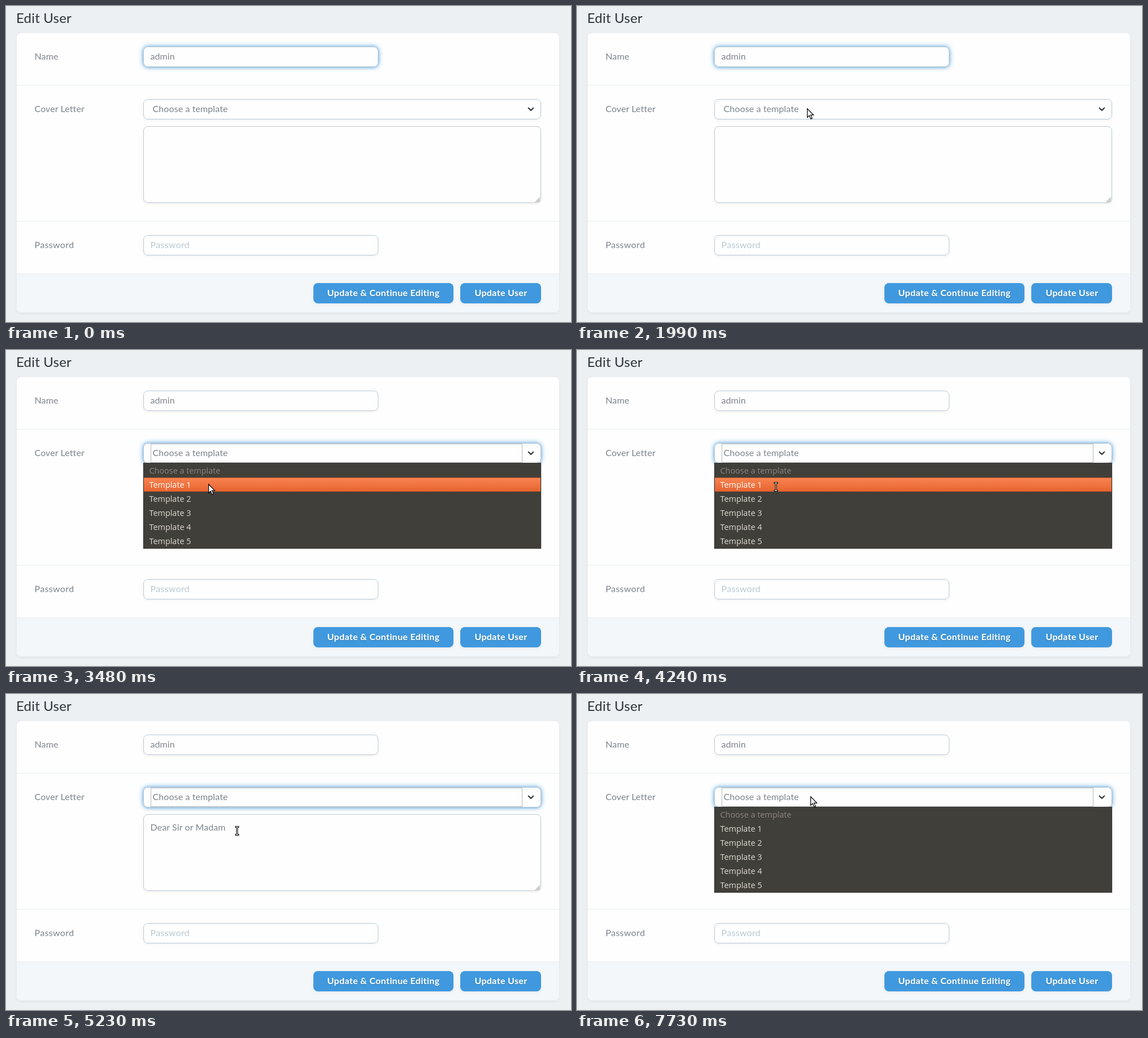
These frames come from a looping animation (1000x560 px, 8 s). An HTML page:

```html
<!DOCTYPE html>
<html lang="en">
<head>
<meta charset="utf-8">
<title>Edit User</title>
<style>
  html, body { margin: 0; width: 100%; height: 100%; overflow: hidden; background: #ecf0f3; }
  svg { display: block; width: 1000px; height: 560px; cursor: default; }
  text { font: 16px Lato, "Open Sans", sans-serif; letter-spacing: .1px; fill: #7c858e; white-space: pre; }
  .title { font-size: 24px; letter-spacing: .2px; fill: #2b333d; }
  .hint { fill: #b9c8d3; letter-spacing: .3px; }
  .wide { letter-spacing: .35px; }
  .button text { font-weight: 700; letter-spacing: .35px; fill: #fff; text-anchor: middle; filter: url(#textShade); }
  .button rect { fill: #4099de; filter: url(#soft); }
  .field { fill: #fefefe; stroke: #bacad6; filter: url(#soft); }
  .glow { fill: #4099de; filter: url(#blur); }
  .line { stroke: #e9eef1; }
  .menu text { font: 14.4px "Open Sans", "Noto Sans", sans-serif; letter-spacing: 0; fill: #dfdbd2; }
  .menu .off { fill: #8d8680; }
  .menu .lit { fill: #fff; }
</style>
</head>
<body>
<svg viewBox="0 0 1000 560" xmlns="http://www.w3.org/2000/svg">
  <defs>
    <filter id="blur" filterUnits="userSpaceOnUse" x="220" y="50" width="750" height="170">
      <feGaussianBlur stdDeviation="4"/>
    </filter>
    <filter id="soft" filterUnits="userSpaceOnUse" x="0" y="0" width="1000" height="560">
      <feDropShadow dx="0" dy="2" stdDeviation="2" flood-opacity=".05"/>
    </filter>
    <filter id="textShade" filterUnits="userSpaceOnUse" x="530" y="480" width="440" height="60">
      <feDropShadow dx="0" dy="1" stdDeviation="1" flood-opacity=".2"/>
    </filter>
    <linearGradient id="orange" x2="0" y2="1">
      <stop stop-color="#f98452"/>
      <stop offset="1" stop-color="#e7642f"/>
    </linearGradient>
  </defs>

  <rect width="1000" height="560" fill="#ecf0f3"/>
  <text class="title" x="18" y="30">Edit User</text>
  <rect x="19" y="48" width="960" height="495" rx="8" fill="#fefefe" filter="url(#soft)"/>
  <path d="M19 475H979V535a8 8 0 0 1-8 8H27a8 8 0 0 1-8-8Z" fill="#f3f7fa"/>
  <path class="line" d="M19 140.5H979M19 381.5H979M19 474.5H979"/>

  <text x="50.5" y="95">Name</text>
  <text x="50.5" y="188">Cover Letter</text>
  <text class="wide" x="50.5" y="429">Password</text>

  <rect id="nameGlow" class="glow" x="243" y="72" width="416" height="36" rx="8"/>
  <rect class="field" x="243.5" y="72.5" width="415" height="35" rx="7.5"/>
  <text x="255.5" y="95">admin</text>
  <path id="caret" d="M300.5 79V101" stroke="#5f6770"/>

  <rect id="pickGlow" class="glow" x="243" y="165" width="704" height="36" rx="8"/>
  <rect class="field" x="243.5" y="165.5" width="703" height="35" rx="7.5"/>
  <rect id="ring" x="256.5" y="166.5" width="657" height="33" fill="none" stroke="#6f767d" stroke-dasharray="1 1"/>
  <text x="259.5" y="188">Choose a template</text>
  <path d="M924.7 180.7L929 185L933.3 180.7" fill="none" stroke="#252d37" stroke-width="2" stroke-linecap="round" stroke-linejoin="round"/>

  <rect class="field" x="243.5" y="213.5" width="703" height="135" rx="7.5"/>
  <path d="M937 347.5L945 339.5M940 347.5L945 342.5M943 347.5L945 345.5" stroke="#747474"/>
  <text id="letter" x="255.5" y="242">Dear Sir or Madam</text>

  <rect class="field" x="243.5" y="406.5" width="415" height="35" rx="7.5"/>
  <text class="hint" x="255.5" y="429">Password</text>

  <g class="button">
    <rect x="544" y="491" width="248" height="36" rx="8"/>
    <text x="668" y="514">Update &amp; Continue Editing</text>
    <rect x="804" y="491" width="143" height="36" rx="8"/>
    <text x="876" y="514">Update User</text>
  </g>

  <g id="menu" class="menu">
    <rect x="242" y="199" width="706" height="154" rx="1" fill="#000" opacity=".13"/>
    <rect x="243.5" y="200.5" width="703" height="151" fill="#413f3a" stroke="#33312d"/>
    <g id="bar">
      <rect x="244" y="226" width="702" height="25" fill="url(#orange)"/>
      <path d="M244 226.5H946M244 250.5H946" stroke="#d3592b"/>
    </g>
    <g id="options"></g>
  </g>

  <path id="arrow" d="M.6 1V16.4L4.1 13.1L6.8 19.3L9.3 18.2L6.7 12.2H11.6Z" fill="#fff" stroke="#000" stroke-width="1.2"/>
  <g id="beam" fill="none">
    <path d="M.5 1.5H7.5M.5 15.5H7.5M4 1.5V15.5" stroke="#000" stroke-width="3"/>
    <path d="M1.5 1.5H6.5M1.5 15.5H6.5M4 1.5V15.5" stroke="#fff"/>
  </g>
</svg>
<script>
const LOOP = 8000;
const el = id => document.getElementById(id);
const parts = {};
for (const id of ["nameGlow", "caret", "pickGlow", "ring", "letter", "menu", "bar", "options", "arrow", "beam"]) {
  parts[id] = el(id);
}

["Choose a template", 1, 2, 3, 4, 5].forEach((label, i) => {
  const row = document.createElementNS("http://www.w3.org/2000/svg", "text");
  row.setAttribute("x", 253.5);
  row.setAttribute("y", 219 + 25 * i);
  row.textContent = i ? "Template " + label : label;
  if (!i) row.setAttribute("class", "off");
  parts.options.append(row);
});
const firstRow = parts.options.children[1];

// Pointer stops: time, shape, left, top. The pointer jumps from one to the next.
const stops = [
  [490, "arrow", 903, 484],
  [730, "beam", 802, 311],
  [980, "beam", 591, 208],
  [1230, "arrow", 507, 190],
  [1480, "arrow", 454, 175],
  [1730, "arrow", 414, 177],
  [1990, "arrow", 407, 181],
  [2990, "arrow", 406, 182],
  [3240, "arrow", 375, 221],
  [3480, "arrow", 358, 237],
  [3730, "arrow", 351, 237],
  [3990, "arrow", 349, 238],
  [4240, "beam", 348, 234],
  [4980, "beam", 354, 234],
  [5230, "beam", 405, 234],
  [6500, "beam", 407, 213],
  [6730, "arrow", 411, 190],
  [6980, "arrow", 412, 184],
  [7250, "arrow", 413, 181]
];

const show = (node, on) => node.setAttribute("visibility", on ? "inherit" : "hidden");

function draw(t) {
  const within = (from, to = LOOP) => t >= from && t < to;
  const picked = within(2730);
  const hover = within(3480, 4480);

  show(parts.nameGlow, !picked);
  show(parts.caret, within(250, 1730));
  show(parts.pickGlow, picked);
  show(parts.ring, picked);
  show(parts.menu, within(2730, 4480) || within(7730));
  show(parts.bar, hover);
  show(parts.letter, within(4730));
  firstRow.setAttribute("class", hover ? "lit" : "");

  const stop = stops.filter(s => s[0] <= t).pop();
  for (const shape of ["arrow", "beam"]) {
    const on = !!stop && stop[1] === shape;
    show(parts[shape], on);
    if (on) parts[shape].setAttribute("transform", `translate(${stop[2]} ${stop[3]})`);
  }
}

const start = performance.now();
function tick() {
  draw((performance.now() - start) % LOOP);
  requestAnimationFrame(tick);
}
draw(0);
requestAnimationFrame(tick);
</script>
</body>
</html>
```
